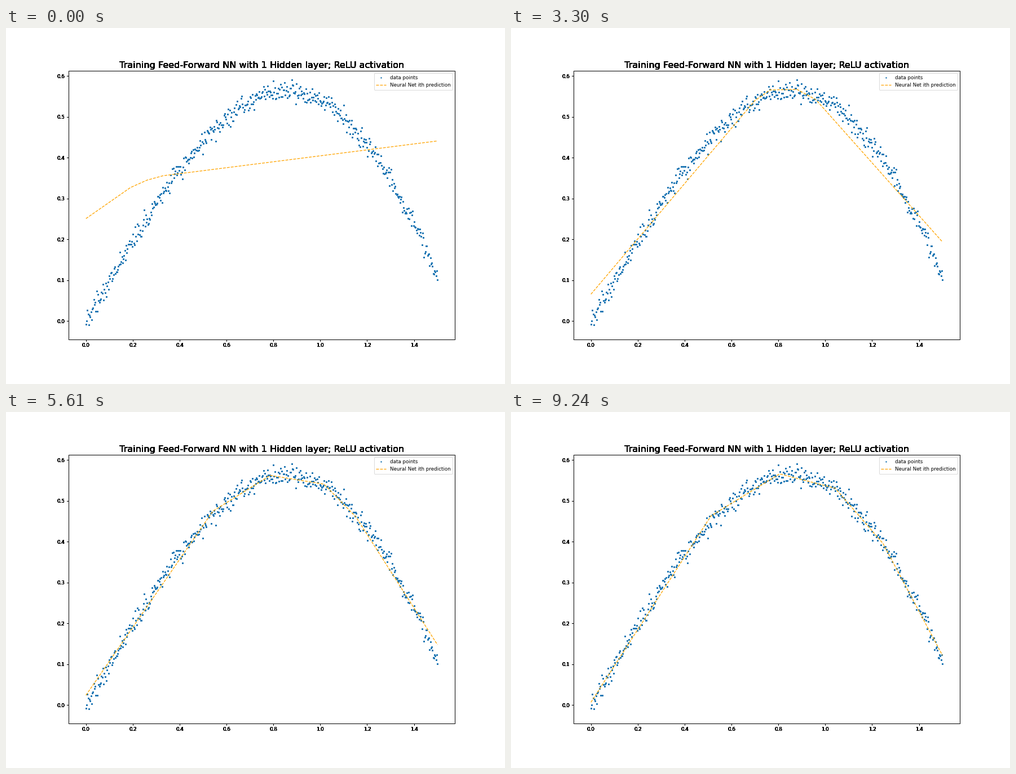
A matplotlib script that plays this animation: 885 by 632 pixels, repeating every 9.57 s.

```python
import numpy as np
import matplotlib.pyplot as plt
from matplotlib.animation import FuncAnimation

W, H, DPI = 885, 632, 64
FRAMES, STEP_MS = 29, 330
LAYERS = 9  # repeated drawing hardens the antialiased edges
UNIT = 63.2 / DPI
FONT = 10 * UNIT
TITLE = "Training Feed-Forward NN with 1 Hidden layer; ReLU activation"
X_MAX = 1.5

# Corners of the fitted curve at key training steps
POSES = {
    0: [(0, .251), (.19, .327), (.26, .345), (.33, .356), (.4, .361), (X_MAX, .441)],
    4: [(0, .182), (.71, .467), (.73, .474), (.755, .478), (.775, .475), (X_MAX, .353)],
    8: [(0, .098), (.72, .573), (.765, .594), (.82, .595), (.88, .573), (X_MAX, .235)],
    10: [(0, .066), (.7, .54), (.765, .566), (.88, .567), (.96, .542), (X_MAX, .194)],
    14: [(0, .035), (.56, .482), (.775, .56), (1, .547), (1.095, .5), (X_MAX, .164)],
    28: [(0, .007), (.512, .463), (.805, .566), (1.042, .531), (1.246, .396), (X_MAX, .122)],
}
SETTLE = 14  # from here on the fit only creeps to its final shape


def make_data(n=500):
    rng = np.random.default_rng(4)
    x = np.linspace(0, X_MAX, n)
    return x, x * np.cos(x) + np.clip(rng.normal(0, .0125, n), -.03, .03)


def fit(step):
    if step > SETTLE:
        span = FRAMES - 1 - SETTLE
        left = 1 - (step - SETTLE) / span
        step = SETTLE + span * (1 - left ** 2)
    corners = np.array(list(POSES.values())).reshape(len(POSES), -1)
    now = [np.interp(step, list(POSES), track) for track in corners.T]
    return now[::2], now[1::2]


def add_layer(fig, x, y):
    ax = fig.add_axes([.125, .125, .7748, .755], facecolor="none")
    ax.set(xlim=(-.075, 1.575), ylim=(-.0449, .6129),
           xticks=np.arange(0, 1.5, .2), yticks=np.arange(0, .65, .1))
    ax.xaxis.set_major_formatter("{x:.1f}")
    ax.yaxis.set_major_formatter("{x:.1f}")
    ax.set_title(TITLE, fontsize=18)
    ax.scatter(x, y, s=3, color="tab:blue", label="data points")
    return ax


plt.rcParams.update({"font.family": "DejaVu Sans", "font.size": FONT,
                     "legend.fontsize": FONT})
fig = plt.figure(figsize=(W / DPI, H / DPI), dpi=DPI, facecolor="white")
x, y = make_data()
for _ in range(LAYERS):
    ax = add_layer(fig, x, y)

line, = ax.plot([], [], "--", color="orange", lw=1.5 * UNIT,
                label="Neural Net ith prediction")
ax.legend(loc="upper right")


def update(step):
    line.set_data(*fit(step))
    return line,


anim = FuncAnimation(fig, update, frames=FRAMES, interval=STEP_MS,
                     repeat=True, repeat_delay=0)
plt.show()
```
